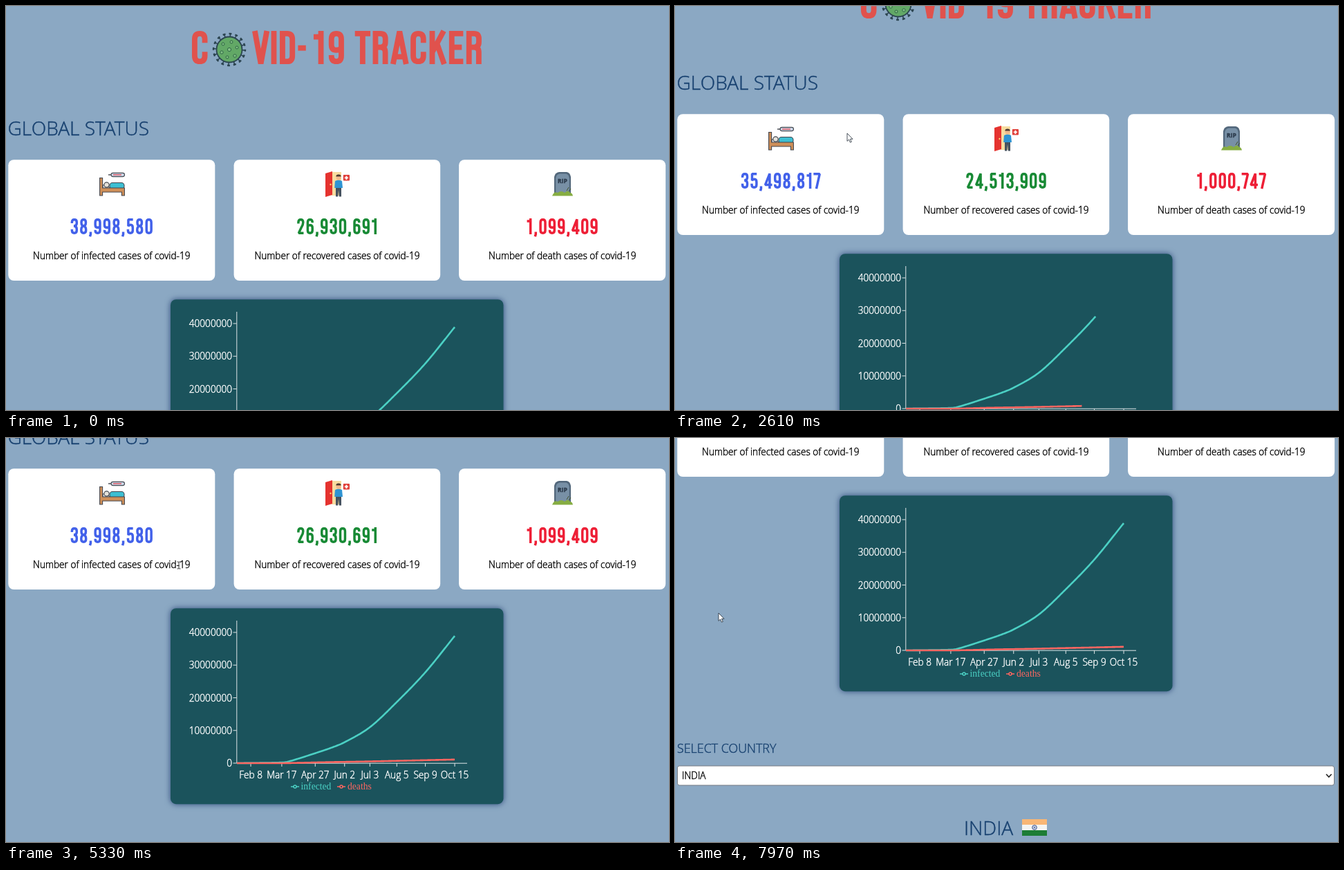
Animation, 959 px wide and 584 px high, one loop 8000 ms. Source, as an HTML page:

```html
<!DOCTYPE html>
<html lang="en">
<head>
<meta charset="utf-8">
<title>Covid-19 Tracker</title>
<style>
html, body { margin: 0; width: 100%; height: 100%; overflow: hidden; background: #8ba8c3; }
body { position: relative; font: 300 13.64px "Open Sans", sans-serif; color: #000; }
svg { position: absolute; left: 0; top: 0; }
text { fill: currentColor; stroke: currentColor; stroke-width: .4; }
.glyphs { fill: none; stroke-width: 106; stroke-linejoin: bevel; }
.title { stroke: #e0524d; stroke-width: 114; }
.head { color: #17406f; font-size: 28.1px; }
.sub { color: #17406f; font-size: 17.9px; }
.mid { text-anchor: middle; }
.rip { color: #2c3b4c; font-size: 8.5px; font-weight: 700; }
#axes { color: #fff; }
#axes path { fill: none; stroke: #dfe6e8; }
.line { fill: none; stroke-width: 2.6; }
.key { font: 13.64px "Liberation Serif", serif; fill: #1b535c; stroke: currentColor; stroke-width: 1.5; }
.key text { stroke: none; }
.teal { color: #4bd0c4; }
.red { color: #fd6661; }
.dot { fill: currentColor; stroke: #fff; stroke-width: 1.8; }
.line, .key { stroke: currentColor; }
.panel { filter: drop-shadow(0 0 4px #2c4878); }
#tip {
  position: absolute; left: 0; top: 0; box-sizing: border-box; height: 87px; padding: 7.5px 8.5px;
  background: #fff; border: 1px solid #ccc; white-space: nowrap; line-height: 25.5px;
  -webkit-text-stroke: .3px currentColor;
}
#day { text-align: center; color: #4261ea; line-height: 18.6px; }
</style>
</head>
<body>
<svg width="959" height="584">
  <g id="page">
    <g id="header">
      <g role="img" aria-label="COVID-19 TRACKER">
        <g class="glyphs title" data-x="267" data-s="C"></g>
        <g class="glyphs title" data-x="355.5" data-s="VID-"></g>
        <g class="glyphs title" data-x="441.5" data-s="19"></g>
        <g class="glyphs title" data-x="504" data-s="TRACKER"></g>
      </g>
      <g transform="translate(323 63)" fill="none" stroke="#2b4450">
        <circle r="21" stroke-width="4" stroke-dasharray="1.6 6.65"/>
        <circle r="23" stroke-width="2.4" stroke-dasharray="4 5.03" stroke-dashoffset="1.2"/>
        <circle r="18.5" fill="#62a866" stroke-width="1.8"/>
        <g stroke="#2f6546" fill="#82c184">
          <circle r="2.6"/><circle cx="-9" cy="-8" r="2"/><circle cx="3" cy="-11" r="2"/>
          <circle cx="11" cy="-3" r="2"/><circle cx="8" cy="9" r="2.2"/>
          <circle cx="-3" cy="11" r="2"/><circle cx="-11" cy="4" r="2.2"/>
        </g>
      </g>
      <text class="head" x="2.5" y="187">GLOBAL STATUS</text>
    </g>

    <g id="cards">
      <g fill="#fff">
        <rect x="3.3" y="222.2" width="299" height="174.8" rx="8"/>
        <rect x="329.6" y="222.2" width="298.6" height="174.8" rx="8"/>
        <rect x="655.1" y="222.2" width="299" height="174.8" rx="8"/>
      </g>
      <g transform="translate(135 240)" stroke="#43474f" stroke-width="1.1">
        <rect x="17" y="1.4" width="19.5" height="5.2" rx="2.6" fill="#ccd9ea"/>
        <path d="M13 4H17" stroke-width="1.4"/>
        <path d="M20 4H32" stroke="#dc4a54" stroke-width="1.4"/>
        <rect x="15" y="15.5" width="21" height="9" rx="4" fill="#3dbfd2"/>
        <path d="M5 24V19Q10 17 16 24Z" fill="#eef2f6"/>
        <circle cx="10.5" cy="18.5" r="3.6" fill="#e6e2da"/>
        <path d="M.6 34V8.5H4.6V23H36.4V34H32.4V29H4.6V34Z" fill="#cf8f58"/>
      </g>
      <g transform="translate(462 239)">
        <path d="M9 1H23V35H9Z" fill="#f7dc9f"/>
        <path d="M0 3L10 0V34L0 37Z" fill="#e5332f"/>
        <circle cx="7.5" cy="19" r="1.2" fill="#f8d36a"/>
        <path d="M15 24H23V36.5H19.8L19 27 18.2 36.5H15Z" fill="#46525f"/>
        <path d="M14 14Q19 11 24 14L25 24H13.2Z" fill="#2f94d3"/>
        <circle cx="19" cy="9" r="3.6" fill="#f2b98b"/>
        <path d="M15.3 7.5Q15.3 4.4 19 4.4T22.7 7.5Z" fill="#4b3a32"/>
        <rect x="25.8" y="5" width="9.2" height="8.6" rx="1" fill="#e0403a"/>
        <path d="M27.8 9.3H33M30.4 6.7V11.9" stroke="#fff" stroke-width="1.8"/>
      </g>
      <g transform="translate(790 240)">
        <path d="M3 31V7Q4 1 10 0H21Q26 1 27 7V31Z" fill="#52677b"/>
        <path d="M5.2 31V9Q6 3 11 2.4H20Q24 3 24.8 9V31Z" fill="#7890a6"/>
        <text class="mid rip" x="15" y="15.5">RIP</text>
        <path d="M21 27L24 22M24 28L27 24" stroke="#44552f"/>
        <path d="M0 34.5Q3 27 8 30Q13 26 18 30Q23 25 26 30Q29 30 30 34.5Z" fill="#86ad42"/>
      </g>
      <g class="mid">
        <text x="152.8" y="366">Number of infected cases of covid-19</text>
        <text x="479" y="366">Number of recovered cases of covid-19</text>
        <text x="804.8" y="366">Number of death cases of covid-19</text>
      </g>
      <g class="glyphs" id="n0" stroke="#4261ea"></g>
      <g class="glyphs" id="n1" stroke="#188a35"></g>
      <g class="glyphs" id="n2" stroke="#ee1f36"></g>
    </g>

    <g id="chart">
      <rect class="panel" x="238" y="424.2" width="481.5" height="283" rx="8" fill="#1b535c"/>
      <g id="axes"></g>
      <path id="l0" class="line teal"/>
      <path id="l1" class="line red"/>
      <g class="key teal">
        <path d="M412 682H424"/><circle cx="418" cy="682" r="2"/>
        <text x="426.5" y="685.5">infected</text>
      </g>
      <g class="key red">
        <path d="M479 682H491"/><circle cx="485" cy="682" r="2"/>
        <text x="494" y="685.5">deaths</text>
      </g>
      <g id="hover">
        <path d="M0 442V648" stroke="#c9d3d6"/>
        <circle id="d0" class="dot teal" r="3.9"/>
        <circle id="d1" class="dot red" r="3.9"/>
      </g>
    </g>

    <text class="sub" x="3" y="795.5">SELECT COUNTRY</text>
    <rect x="3.5" y="815" width="950" height="28" rx="3" fill="#fff" stroke="#767b82"/>
    <text x="10" y="834">INDIA</text>
    <path d="M942 827L945.8 831 949.6 827" fill="none" stroke="#222" stroke-width="1.6"/>
    <text class="head" x="418" y="915">INDIA</text>
    <g transform="translate(502 892)">
      <path d="M0 0H36V24H0Z" fill="#f4f4f2"/>
      <path d="M0 0H36V8H0Z" fill="#f8b675"/>
      <path d="M0 16H36V24H0Z" fill="#1d7d35"/>
      <circle cx="18" cy="12" r="3.3" fill="#c9d2e4" stroke="#3c5390"/>
      <circle cx="18" cy="12" r=".9" fill="#3c5390"/>
    </g>
  </g>
</svg>
<div id="tip"><div id="day"></div><div id="inf" class="teal"></div><div id="dead" class="red"></div></div>
<svg id="mouse" width="959" height="584">
  <path id="arrow" d="M0 0V11.4L2.6 9 4.4 13.2 6.3 12.4 4.5 8.3H8Z" fill="#fff" stroke="#1c2733" stroke-width=".8"/>
  <path id="beam" d="M-2.5 -5H-.8L0 -4.3 .8 -5H2.5M-2.5 5H-.8L0 4.3 .8 5H2.5M0 -4.5V4.5" fill="none" stroke="#333"/>
</svg>

<script>
const $ = id => document.getElementById(id);
const LOOP = 8000, TICK = 76.9;

// Condensed display lettering: [advance, centre line], cap height 700
const GLYPHS = {
  C: [388, 'M300 250V175Q300 56 193 56Q86 56 86 175V525Q86 644 193 644Q300 644 300 525V440'],
  V: [382, 'M64 0L191 690 318 0'],
  I: [168, 'M84 0V700'],
  D: [400, 'M98 56H195Q306 56 306 180V520Q306 644 195 644H98M98 0V700'],
  '-': [216, 'M25 360H191'],
  T: [346, 'M10 56H336M173 56V700'],
  R: [404, 'M98 700V0M98 56H200Q306 56 306 165V235Q306 345 200 345H98M200 345Q304 345 304 450V700'],
  A: [404, 'M64 700L202 10 340 700M110 545H294'],
  K: [412, 'M98 0V700M340 0L110 430M200 270L350 700'],
  E: [364, 'M340 56H98V644H340M98 0V700M98 345H310'],
  0: [410, 'M205 56Q310 56 310 175V525Q310 644 205 644Q100 644 100 525V175Q100 56 205 56Z'],
  1: [330, 'M205 0V700M50 125H205'],
  2: [410, 'M100 230V175Q100 56 205 56Q310 56 310 175Q310 280 230 400L115 644H330'],
  3: [405, 'M98 210V175Q98 56 203 56Q308 56 308 165V220Q308 325 180 335Q308 345 308 460V525Q308 644 203 644Q98 644 98 525V480'],
  4: [410, 'M270 700V40L75 535H380'],
  5: [405, 'M320 56H115V340Q160 280 210 280Q310 285 310 400V525Q310 644 205 644Q100 644 100 525V480'],
  6: [410, 'M308 190V175Q308 56 204 56Q100 56 100 175V525Q100 644 204 644Q308 644 308 525V410Q308 295 204 295Q125 295 100 350'],
  7: [350, 'M20 56H290L145 700'],
  8: [410, 'M205 56Q303 56 303 175Q303 320 205 335Q107 320 107 175Q107 56 205 56ZM205 335Q310 350 310 520Q310 644 205 644Q100 644 100 520Q100 350 205 335Z'],
  9: [405, 'M96 510V525Q96 644 200 644Q304 644 304 525V175Q304 56 200 56Q96 56 96 175V290Q96 405 200 405Q280 405 304 350'],
  ',': [213, 'M105 590V700L75 800']
};

function letter(g, text, x, y, scale, centred) {
  let w = 0, out = '';
  for (const c of text) {
    const [adv, d] = GLYPHS[c];
    out += `<path transform="translate(${w} 0)" d="${d}"/>`;
    w += adv;
  }
  g.innerHTML = out;
  g.setAttribute('transform', `translate(${centred ? x - w * scale / 2 : x} ${y}) scale(${scale})`);
}
document.querySelectorAll('[data-s]').forEach(g => letter(g, g.dataset.s, +g.dataset.x, 36, .0686));

// Cases by day since 22 January 2020
const infected = [[0, 0], [17, 37e3], [55, 2e5], [62, 42e4], [75, 1350e3], [96, 3040e3], [115, 4639704],
  [132, 64e5], [163, 11e6], [196, 187e5], [231, 278e5], [267, 38917803]];
const deaths = [[0, 0], [55, 8e3], [75, 75e3], [96, 212e3], [115, 314483], [132, 38e4], [163, 525e3],
  [196, 707e3], [231, 9e5], [267, 1098254]];

function valueAt(pts, d) {
  let i = 0;
  while (i < pts.length - 2 && d > pts[i + 1][0]) i++;
  const slope = k => {
    const a = pts[Math.max(k - 1, 0)], b = pts[Math.min(k + 1, pts.length - 1)];
    return (b[1] - a[1]) / (b[0] - a[0]);
  };
  const [x0, y0] = pts[i], [x1, y1] = pts[i + 1];
  const h = x1 - x0, u = (d - x0) / h, v = 1 - u;
  return y0 * v * v * (1 + 2 * u) + y1 * u * u * (3 - 2 * u) + h * u * v * (v * slope(i) - u * slope(i + 1));
}
const dayX = d => 334 + d * 1.18;
const caseY = n => 648 - n * 4.725e-6;
const dayName = d => new Date(2020, 0, 22 + d).toLocaleDateString('en-US', { month: 'short', day: 'numeric' });

[infected, deaths].forEach((pts, i) => {
  let d = '';
  for (let k = 0; k <= 267; k++) d += `${k ? 'L' : 'M'}${dayX(k)} ${caseY(valueAt(pts, k)).toFixed(2)}`;
  $('l' + i).setAttribute('d', d);
  $('l' + i).setAttribute('pathLength', 1);
});

let axes = '', ticks = 'M333.8 442V648.2H667';
for (let n = 0; n <= 4e7; n += 1e7) {
  ticks += `M328.5 ${caseY(n)}h5`;
  axes += `<text x="327" y="${caseY(n) + 5}" text-anchor="end">${n}</text>`;
}
for (const d of [17, 55, 96, 132, 163, 196, 231, 267]) {
  ticks += `M${dayX(d)} 648v5`;
  axes += `<text class="mid" x="${dayX(d)}" y="669.5">${dayName(d)}</text>`;
}
$('axes').innerHTML = `<path d="${ticks}"/>${axes}`;

const clamp = p => Math.max(0, Math.min(1, p));
const smooth = p => (p = clamp(p), p * p * (3 - 2 * p));

// CSS "ease"
function ease(p) {
  p = clamp(p);
  let lo = 0, hi = 1, s = .5;
  for (let i = 0; i < 24; i++) {
    s = (lo + hi) / 2;
    if (.75 * s * (1 - s) + s ** 3 < p) lo = s; else hi = s;
  }
  return .3 * s * (1 - s) ** 2 + 3 * s * s * (1 - s) + s ** 3;
}

// Interpolates rows of [time, x, y]
function along(keys, t) {
  let i = 0;
  while (i < keys.length - 2 && t >= keys[i + 1][0]) i++;
  const a = keys[i], b = keys[i + 1], p = clamp((t - a[0]) / (b[0] - a[0]));
  return [a[1] + (b[1] - a[1]) * p, a[2] + (b[2] - a[2]) * p];
}

const mouseKeys = [[210, 711, 480], [286, 302, 260], [1609, 43, 121], [1700, 43, 121], [2300, 249, 184],
  [5729, 249, 184], [5730, 300, 212], [5961, 472, 302], [6200, 490, 303], [6500, 598, 301],
  [6720, 662, 294], [7419, 662, 294], [7420, 560, 287], [7574, 140, 258], [7650, 63, 253]];
const tipKeys = [[5807, 310, 205], [5961, 370, 205], [6180, 480, 205], [6380, 480, 205], [6600, 442, 205], [6692, 455, 205]];
const leaveKeys = [[7420, 490, 302], [7500, 440, 296]];

function tipAt(t) {
  if (t < 6692) return along(tipKeys, t);
  if (t >= 7420) return along(leaveKeys, t);
  const p = ease((t - 6692) / 400);
  return [455 + 44.5 * p, 205 + 99 * p];
}

const starts = [0, 210, 1610, 5330, 5730, 6570, 7420, 7700, 7810];
const wheel = [2499, 4040, 5300, 7780];
const totals = [38998580, 26930691, 1099409], centres = [152.8, 479, 804.6];
const show = (id, on) => { $(id).style.display = on ? '' : 'none'; };
const move = (id, x, y) => $(id).setAttribute('transform', `translate(${x} ${y})`);

function draw(time) {
  const from = starts.filter(s => s <= time).pop();
  const t = from + Math.floor((time - from + 6) / TICK) * TICK;

  const notches = wheel.reduce((sum, w) => sum + smooth((t - w) / 160), 0);
  move('page', 0, -Math.round(notches * 85.2));

  const before = t < 1610;
  show('header', before || t > 1680);
  show('cards', before || t > 1740);
  show('chart', before || t > 1800);

  let p = (t - 1743.732) / 2500;
  if (before || p > .99) p = 1;
  const part = p === 1 ? 1 : (1 - 2 ** (-10 * Math.max(p, 0))) * 1024 / 1023;
  totals.forEach((n, i) =>
    letter($('n' + i), Math.round(n * part).toLocaleString('en-US'), centres[i], 307, .0329, true));

  [1815, 1852].forEach((s, i) => {
    const q = before ? 1 : ease((t - s) / 1500);
    $('l' + i).setAttribute('stroke-dasharray', q > .999 ? 'none' : `${q} 2`);
  });

  const [x, y] = along(mouseKeys, t);
  const beam = t >= 4220 && t < 5730;
  show('mouse', t >= 1610 || (t >= 210 && t < 360));
  show('arrow', !beam);
  show('beam', beam);
  move('arrow', x, y);
  move('beam', 250, 184);

  const over = t >= 5730 && x > 334 && x < 667;
  show('hover', over);
  show('tip', over);
  if (over) {
    const d = Math.max(0, Math.min(267, Math.round((x - 336) / 1.18)));
    const a = valueAt(infected, d), b = valueAt(deaths, d);
    move('hover', dayX(d), 0);
    $('d0').setAttribute('cy', caseY(a));
    $('d1').setAttribute('cy', caseY(b));
    $('day').textContent = dayName(d);
    $('inf').textContent = 'infected : ' + Math.round(a);
    $('dead').textContent = 'deaths : ' + Math.round(b);
    const [tx, ty] = tipAt(t);
    $('tip').style.transform = `translate(${tx}px, ${ty}px)`;
  }
}

const begin = performance.now();
function frame() {
  draw((performance.now() - begin) % LOOP);
  requestAnimationFrame(frame);
}
frame();
</script>
</body>
</html>
```
